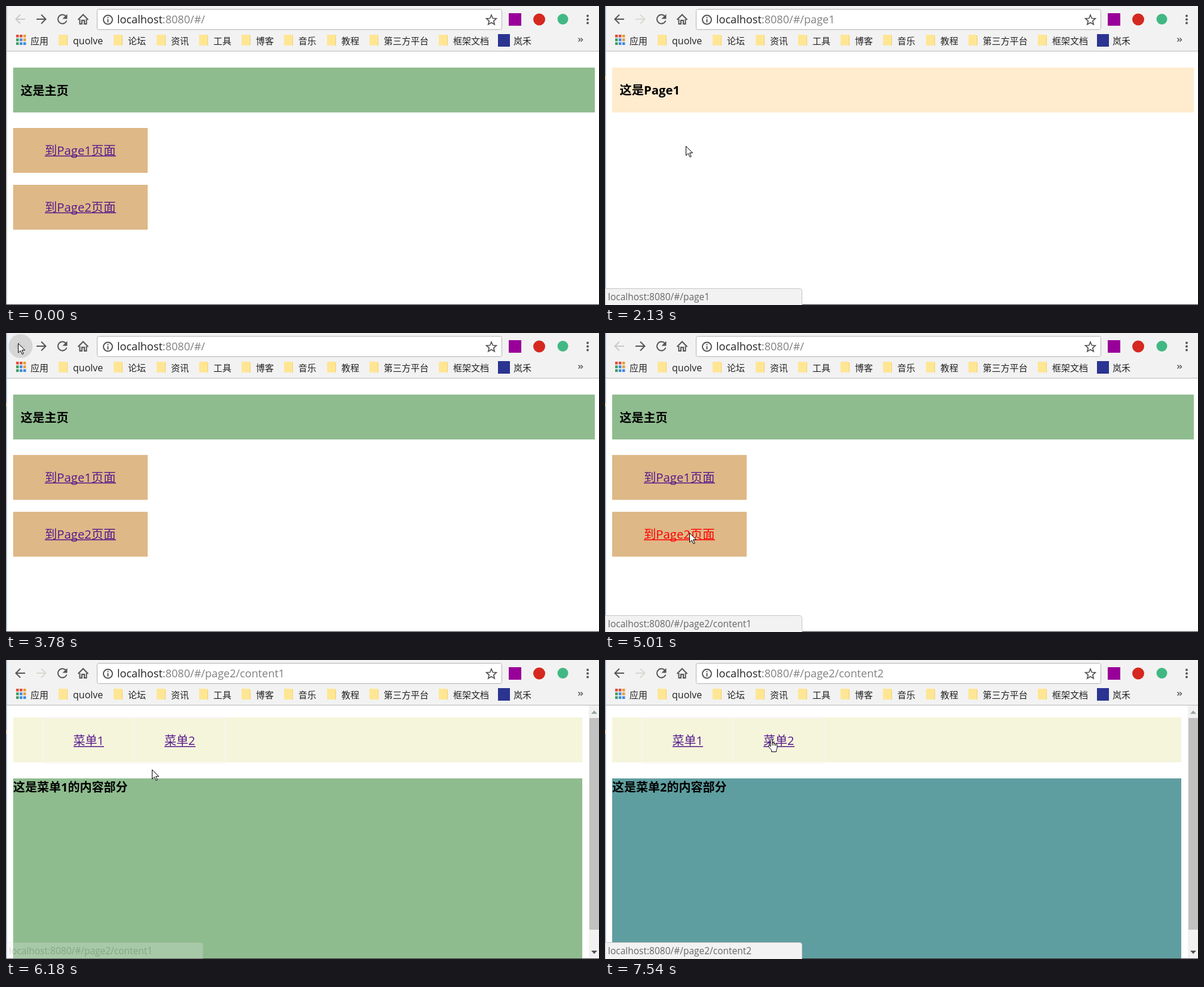
Animation of 992x500 px, one loop 8000 ms. Source, as an HTML page:

```html
<!DOCTYPE html>
<html lang="zh-CN">
<head>
<meta charset="utf-8">
<style>
html, body { margin: 0; width: 100%; height: 100%; overflow: hidden; background: #fff; }
svg { display: block; width: 992px; height: 500px; font: 20px "Open Sans", "Noto Sans CJK SC", "Noto Sans CJK", sans-serif; }
text { white-space: pre; }
.line { fill: none; stroke: #555; stroke-width: 2; }
.bold { font-weight: 700; }
.link { fill: #551a8b; }
.link.active { fill: #f00; }
</style>
</head>
<body>
<svg viewBox="0 0 992 500">
  <g id="home">
    <path fill="#8fbc8f" d="M12 103h973v75H12z"/>
    <text class="bold" x="24.500" y="148.500">这是主页</text>
    <path fill="#deb887" d="M12 204h225v75H12zM12 299h225v75H12z"/>
    <g class="link" id="link1"><text x="65" y="249" font-size="20.300">到Page1页面</text><path d="M65 250h119v1.500H65z"/></g>
    <g class="link" id="link2"><text x="65" y="344" font-size="20.300">到Page2页面</text><path d="M65 345h119v1.500H65z"/></g>
  </g>
  <g id="page1">
    <path fill="#ffebcd" d="M12 103h973v75H12z"/>
    <text class="bold" x="24.500" y="148" font-size="20.300">这是Page1</text>
  </g>
  <g id="page2">
    <path fill="#f5f5dc" d="M12 96h952v75H12z"/>
    <path fill="none" stroke="#f5f5f5" stroke-width="1.500" d="M62.500 96.500h152v76h-152zM214.500 96.500h152v76h-152z"/>
    <g class="link"><text x="112.500" y="142">菜单1</text><path d="M113 144h51v1.500h-51z"/></g>
    <g class="link" id="menu2"><text x="265" y="142">菜单2</text><path d="M265 144h52v1.500h-52z"/></g>
    <path id="content" d="M12 198h952v301H12z"/>
    <text class="bold" id="heading" x="12" y="219.500"></text>
    <path fill="#f1f1f1" d="M975 76h17v424h-17z"/>
    <path fill="#c1c1c1" d="M976 97h16v354h-16z"/>
    <path fill="#96a39a" d="M979 90l5-5.500 5 5.500z"/>
    <path fill="#505050" d="M979 486l5 5.500 5-5.500z"/>
  </g>

  <path fill="#f2f2f2" d="M0 0h992v75H0z"/>
  <path fill="#b9b9b9" d="M0 75h992v1H0z"/>
  <circle id="halo" cx="24.500" cy="22" r="20" fill="#d6d6d6"/>
  <path class="line" id="back" d="M32 22H17M24 14.500L16.500 22l7.500 7.500"/>
  <path class="line" id="next" d="M51 22h15M59 14.500l7.500 7.500-7.500 7.500"/>
  <path class="line" d="M100 17a7.500 7.500 0 1 0 1.500 7.500"/>
  <path fill="#555" d="M102.500 13.500v8h-8z"/>
  <path class="line" d="M120.500 23l8.500-8.500 8.500 8.500M123.500 22v8h3.500v-6h4v6h3.500v-8"/>
  <rect x="152.500" y="5.500" width="677" height="34" rx="3" fill="#fff" stroke="#b3b3b3"/>
  <circle class="line" cx="170.500" cy="23" r="7.500" stroke-width="1.800"/>
  <path fill="#555" d="M169.500 18.500h2v2h-2zM169.500 22h2v5.500h-2z"/>
  <text x="186" y="29" font-size="18.100" fill="#222">localhost<tspan id="path" fill="#808080"></tspan></text>
  <path class="line" style="stroke-width:1.700" d="M812 15l2.300 5.500 6 .5-4.500 4 1.400 5.800-5.200-3.100-5.200 3.100 1.400-5.800-4.500-4 6-.5z"/>
  <path fill="#990099" d="M841 12h21v21h-21z"/>
  <circle cx="892" cy="22.500" r="10" fill="#d5281f"/>
  <circle cx="931.500" cy="22" r="9" fill="#41b883"/>
  <g fill="#555"><circle cx="973" cy="16.500" r="2"/><circle cx="973" cy="22.500" r="2"/><circle cx="973" cy="28.500" r="2"/></g>
  <g id="marks" font-size="15" fill="#222"></g>
  <path fill="#2b3490" d="M823 47h20v21h-20z"/>
  <path fill="none" stroke="#555" stroke-width="1.500" d="M957.500 53.500l3 3-3 3M961.500 53.500l3 3-3 3"/>

  <path id="edge" d="M0 0h1.500v500H0z"/>
  <path id="spot" fill="#f6cfa0" d="M0 117h1.500v6H0z"/>
  <path fill="#3a343a" d="M0 499h992v1H0z"/>
  <g id="status">
    <path fill="#f2f2f2" stroke="#c6c6c6" d="M.5 501V472.500h325q4 0 4 4V501z"/>
    <text id="address" x="5" y="492" font-size="15.500" fill="#666"></text>
  </g>
  <g id="cursor" fill="#fff" stroke="#000" stroke-linejoin="round">
    <path id="arrow" d="M.5.5v15.500l3.700-3.500 2.800 6 2.300-1-2.700-5.800h5z"/>
    <path id="hand" transform="translate(-2)" d="M4 2q0-2 1.500-2t1.500 2v5q1.500-1 3 .5 1.500-.5 2.500.8 1.800-.5 2.500 1.200v5q0 2-1.500 4v3h-8v-3q-3-3-5-6-.5-2 1.500-2 1 .3 2 2zM7 7v4M10 7.500v3.500M12.500 8.500v3"/>
  </g>
</svg>
<script>
const LOOP = 8000, STEP = 77;
const $ = id => document.getElementById(id);
const clamp = v => Math.max(0, Math.min(1, v));
const show = (id, on) => $(id).style.display = on ? '' : 'none';
const ticks = (t, start) => Math.floor((t - start) / STEP) + 1;

// Bookmark bar: app grid, folders and labels
const tints = ['#de4b3c', '#de4b3c', '#e5a036', '#3b9d5d', '#3f8ae0', '#e5a036', '#3b9d5d', '#3f8ae0', '#3f8ae0'];
const label = (x, s, size = 15) => `<text x="${x}" y="64" font-size="${size}">${s}</text>`;
const folders = [[88, 'quolve'], [180, '论坛'], [252, '资讯'], [323, '工具'], [394, '博客'],
  [465, '音乐'], [537, '教程'], [608, '第三方平台'], [724, '框架文档']];
$('marks').innerHTML =
  tints.map((c, i) => `<rect x="${17 + i % 3 * 6}" y="${48 + Math.floor(i / 3) * 6.3}" width="4.500" height="4.500" fill="${c}"/>`).join('') +
  label(41, '应用') + label(849, '岚禾') +
  folders.map(([x, s], i) =>
    `<path fill="#f3cf6b" d="M${x + 2} 49h13v17h-13z"/><rect x="${x}" y="48" width="14" height="18" rx="1" fill="#ffe694"/>` +
    label(x + 24, s, i ? 15 : 16)).join('');

// Pointer moves: start, steps, x, y, ease-out power
const moves = [
  [356, 10, 135, 234, 1.5],
  [2650, 11, 20, 17, 1.5],
  [3870, 7, 124, 282, 1.2],
  [4390, 6, 141, 334, 1.8],
  [5790, 6, 244, 183, 1],
  [6255, 5, 272, 152, 2],
  [6660, 5, 275, 132, 1.5]
];
function pointer(t) {
  let x = 628, y = 467;
  for (const [start, n, toX, toY, power] of moves) {
    const u = 1 - (1 - clamp(ticks(t, start) / n)) ** power;
    x += (toX - x) * u;
    y += (toY - y) * u;
  }
  return [x, y];
}

// Status bubble: appears, starts to fade, route
const hints = [[1210, 2885, 'page1'], [4930, 6025, 'page2/content1'], [7060, 9000, 'page2/content2']];

function draw(t) {
  const page = t >= 5120 ? 'page2' : t >= 2130 && t < 3700 ? 'page1' : 'home';
  const second = t >= 7540;
  for (const id of ['home', 'page1', 'page2']) show(id, id === page);
  $('path').textContent = ':8080/#/' + (page === 'home' ? '' : page === 'page1' ? page : 'page2/content' + (second ? 2 : 1));
  $('content').setAttribute('fill', second ? '#5f9ea0' : '#8fbc8f');
  $('heading').textContent = `这是菜单${second ? 2 : 1}的内容部分`;

  $('back').style.stroke = page === 'home' ? '#c9c9c9' : '#555';
  $('next').style.stroke = page === 'home' ? '#555' : '#d9d8d0';
  show('halo', t >= 3540 && t < 3870);
  $('edge').setAttribute('fill', t < 1980 ? '#ababab' : '#9aaac4');
  show('spot', t >= 1980);

  const press1 = t >= 1980 && t < 2130, press2 = t >= 5010 && t < 5120;
  $('link1').classList.toggle('active', press1);
  $('link2').classList.toggle('active', press2);
  $('menu2').classList.toggle('active', t >= 7350 && t < 7540);

  const [on, off, route] = hints.findLast(h => t >= h[0]) || [LOOP, LOOP, ''];
  $('status').style.opacity = Math.min(clamp(ticks(t, on) / 2), clamp(1 - ticks(t, off) / 4));
  $('address').textContent = 'localhost:8080/#/' + route;

  const [x, y] = pointer(t);
  const inside = (l, top, r, b) => x >= l && x <= r && y >= top && y <= b;
  const over = page === 'home' ? !press1 && !press2 && (inside(65, 229, 184, 255) || inside(65, 324, 184, 350))
    : page === 'page2' && inside(265, 121, 317, 148);
  show('cursor', t >= 280);
  $('cursor').setAttribute('transform', `translate(${Math.round(x)} ${Math.round(y)})`);
  show('hand', over);
  show('arrow', !over);
}

const begin = performance.now();
function frame() {
  draw((performance.now() - begin) % LOOP);
  requestAnimationFrame(frame);
}
frame();
</script>
</body>
</html>
```
